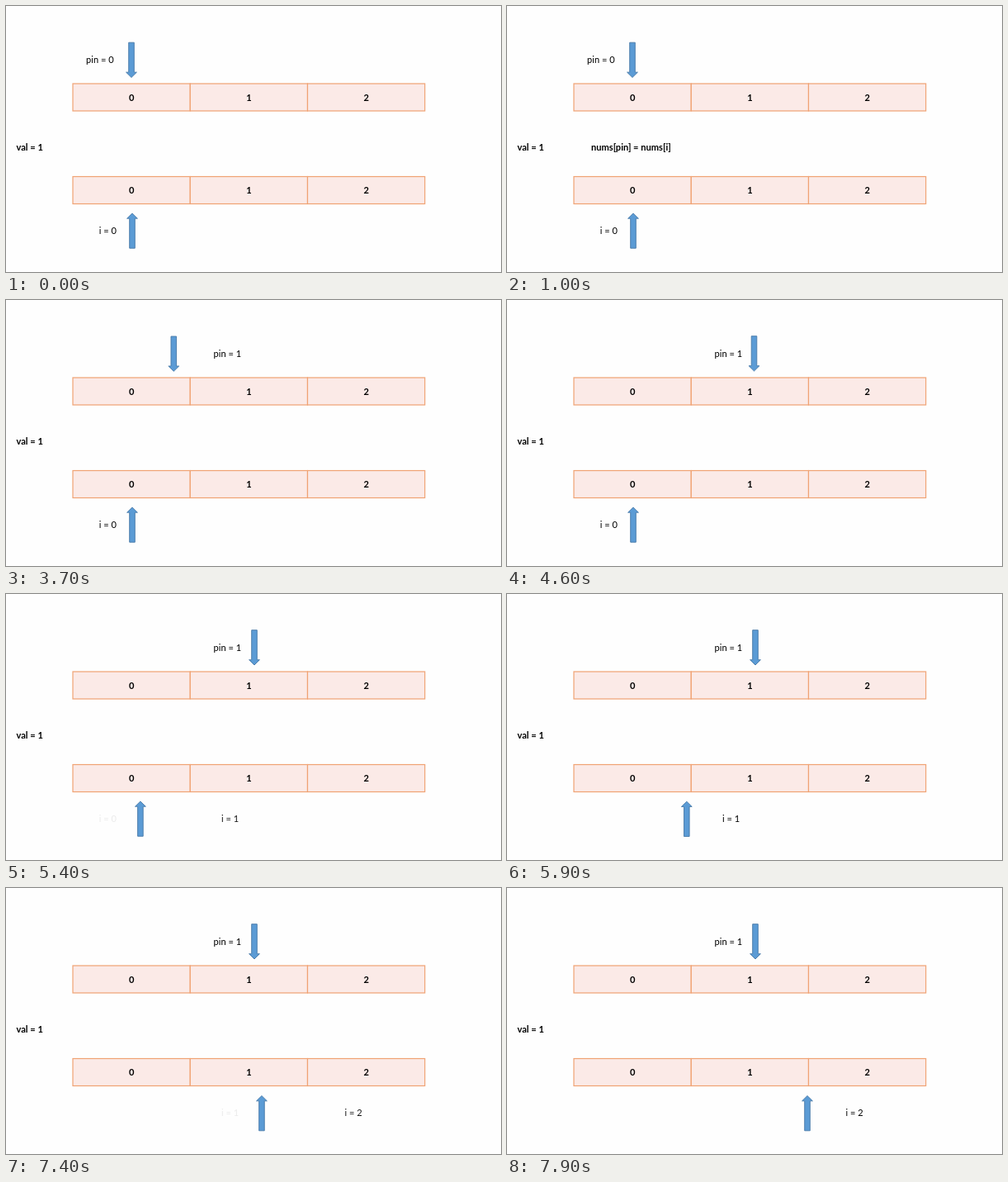
Recreate the animation shown at these times as an HTML page with a canvas. Size 600 px wide and 322 px high, loop 8000 ms.

```html
<!DOCTYPE html>
<html lang="en">
<head>
<meta charset="utf-8">
<title>Two pointers on an array</title>
<style>
html, body { margin: 0; width: 100%; height: 100%; overflow: hidden; background: #fefefe; }
canvas { display: block; width: 600px; height: 322px; }
</style>
</head>
<body>
<canvas id="stage"></canvas>
<script>
const W = 600, H = 322, LOOP = 8000;
const FADE = 500, MOVE = 1750;
const canvas = document.getElementById('stage');
const ctx = canvas.getContext('2d');
const ratio = window.devicePixelRatio || 1;
canvas.width = W * ratio;
canvas.height = H * ratio;
ctx.scale(ratio, ratio);

const clamp = v => Math.min(1, Math.max(0, v));
const fade = (t, start) => clamp((t - start) / FADE);
const mix = (a, b, p) => a + (b - a) * p;

// Constant acceleration for the first half, constant braking for the second.
function glide(t, start) {
  const p = clamp((t - start) / MOVE);
  return p < 0.5 ? 2 * p * p : 1 - 2 * (1 - p) * (1 - p);
}

function text(str, x, y, { bold = false, align = 'left', alpha = 1 } = {}) {
  if (alpha <= 0) return;
  ctx.globalAlpha = alpha;
  ctx.font = `${bold ? 'bold ' : ''}11.1px Lato, sans-serif`;
  ctx.textAlign = align;
  ctx.fillStyle = '#000';
  ctx.fillText(str, x, y);
  ctx.globalAlpha = 1;
}

function row(y) {
  ctx.strokeStyle = '#f0a273';
  ctx.lineWidth = 1.2;
  [81, 223.3, 365.5].forEach((x, i) => {
    ctx.fillStyle = '#fbeae7';
    ctx.fillRect(x, y, 142.2, 33);
    ctx.strokeRect(x, y, 142.2, 33);
    text(String(i), x + 71.1, y + 20.7, { bold: true, align: 'center' });
  });
}

// dir is 1 for an arrow pointing down from its tail, -1 for up.
function arrow(x, tail, dir) {
  const points = [[-3.3, 0], [3.3, 0], [3.3, 36], [6.4, 36], [0, 42.3], [-6.4, 36], [-3.3, 36]];
  ctx.beginPath();
  points.forEach(([dx, dy]) => ctx.lineTo(x + dx, tail + dir * dy));
  ctx.closePath();
  ctx.fillStyle = '#5b9bd5';
  ctx.fill();
  ctx.strokeStyle = '#4779a8';
  ctx.lineWidth = 0.9;
  ctx.stroke();
}

function draw(t) {
  ctx.fillStyle = '#fefefe';
  ctx.fillRect(0, 0, W, H);
  row(94);
  row(206.5);

  text('val = 1', 12.5, 175.3, { bold: true });
  text('nums[pin] = nums[i]', 102, 175.3, { bold: true, alpha: fade(t, 450) - fade(t, 1850) });

  const pinSwap = fade(t, 2840);
  text('pin = 0', 97, 69.4, { alpha: 1 - pinSwap });
  text('pin = 1', 251.5, 69.4, { alpha: pinSwap });
  const pin = glide(t, 2975);
  arrow(mix(152, 301, pin), mix(44.2, 43.7, pin), 1);

  const firstSwap = fade(t, 4940), secondSwap = fade(t, 6940);
  text('i = 0', 112.8, 276.2, { alpha: 1 - firstSwap });
  text('i = 1', 261, 276.2, { alpha: firstSwap - secondSwap });
  text('i = 2', 410.5, 276.2, { alpha: secondSwap });
  const first = glide(t, 5080), second = glide(t, 7080);
  arrow(153 + 147.2 * first + 145 * second, mix(293.2, 293.8, first), -1);
}

const begin = performance.now();
function tick() {
  draw((performance.now() - begin) % LOOP);
  requestAnimationFrame(tick);
}
tick();
</script>
</body>
</html>
```
